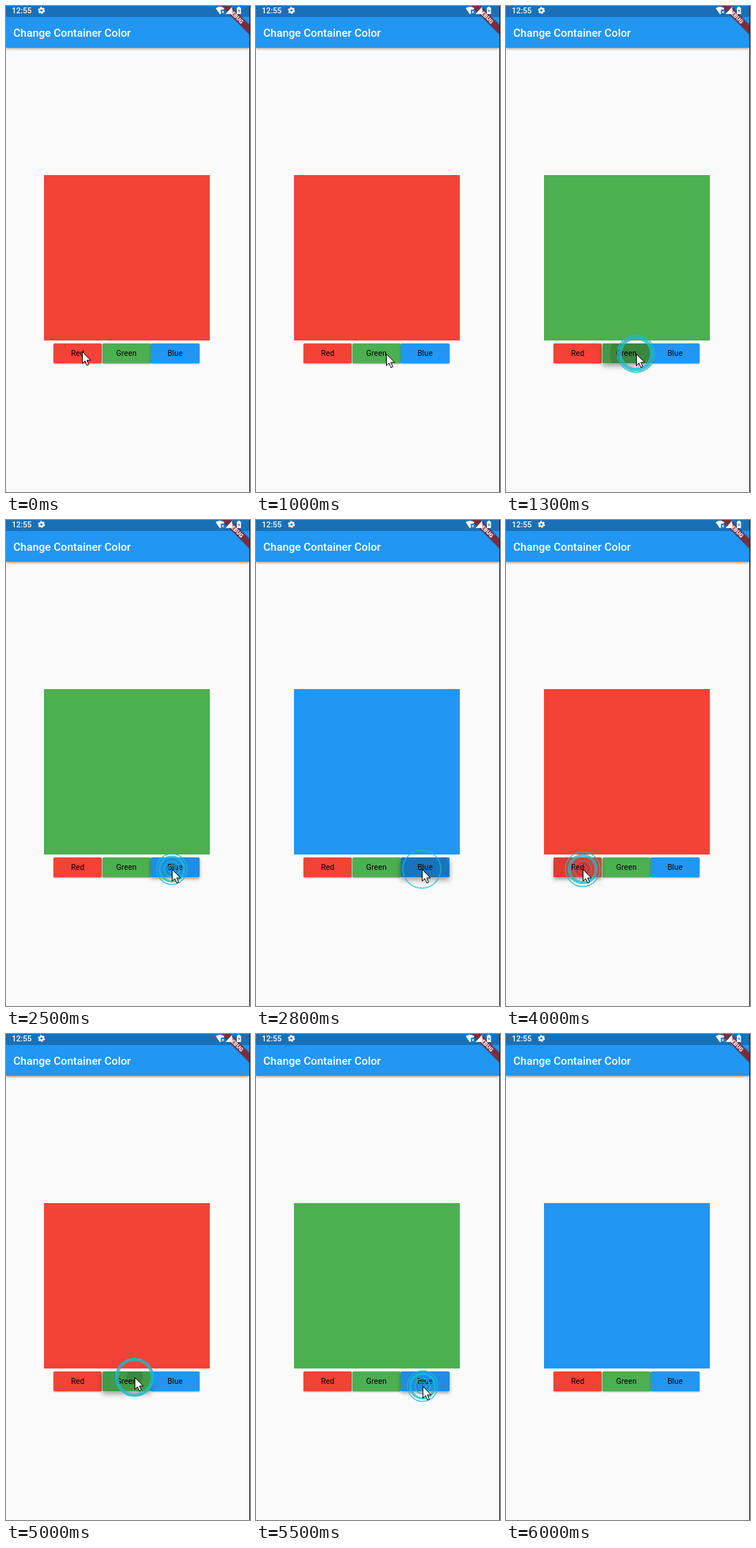
An HTML page for the animation above (6.7 s loop, 334 px wide and 664 px high).

```html
<!DOCTYPE html>
<html lang="en">
<head>
<meta charset="utf-8">
<title>Change Container Color</title>
<style>
html, body { margin: 0; width: 100%; height: 100%; overflow: hidden; }
body { background: #fafafa; font-family: Roboto, sans-serif; font-weight: 500; }
#stage { position: relative; width: 334px; height: 664px; overflow: hidden; }
#stage > * { position: absolute; }
.status { left: 0; top: 0; width: 333px; height: 15px; background: #1a70b6; }
.bar {
  left: 0; top: 15px; width: 333px; height: 42.3px; background: #2196f3;
  box-shadow: 0 1.5px 3px rgba(0,0,0,.38);
}
.bar span {
  position: absolute; left: 10px; top: 1px; line-height: 43px;
  font-size: 15.1px; color: #fff; white-space: nowrap;
}
#box { left: 51.5px; top: 230.5px; width: 227px; height: 226px; }
.btn {
  top: 460.8px; width: 66.4px; height: 27.3px; border-radius: 1.5px;
  font-size: 10.57px; font-weight: 400; letter-spacing: .1px;
  line-height: 27.3px; text-align: center; color: #000;
}
svg { left: 0; top: 0; z-index: 2; }
</style>
</head>
<body>
<div id="stage">
  <div class="status"></div>
  <div class="bar"><span>Change Container Color</span></div>
  <div id="box"></div>
  <div class="btn" style="left:65px">Red</div>
  <div class="btn" style="left:131.6px">Green</div>
  <div class="btn" style="left:198.2px">Blue</div>
  <svg width="334" height="664" viewBox="0 0 334 664">
    <g transform="translate(315 14) rotate(45)">
      <rect x="-30" y="-5.5" width="60" height="11" fill-opacity=".15"/>
      <rect x="-30" y="-4.5" width="60" height="9" fill="#792d3f"/>
      <text y="2.8" text-anchor="middle" font-size="7.7" font-weight="900" fill="#fff">DEBUG</text>
    </g>
    <g fill="#fff">
      <text x="8" y="10.2" font-size="10.7">12:55</text>
      <circle cx="48.5" cy="6" r="2.7" fill="none" stroke="#fff" stroke-width="2.2"/>
      <circle cx="48.5" cy="6" r="4.2" fill="none" stroke="#fff" stroke-width="1.3" stroke-dasharray="2.2 2.2"/>
      <path d="M287 3Q293 -1 299 3L297.5 5H294V10.5L293 11.5Z"/>
      <path d="M295.3 6.5l3 3.5m0-3.5l-3 3.5" stroke="#fff"/>
      <path d="M309.5 1V11H300.5Z"/>
      <path d="M316 2.2h1.5V1h2.6v1.2h1.5V11H316Z"/>
      <path d="M319.3 3.7l-1.7 3.2h1.1v2.7l1.7-3.5h-1.1Z" fill="#1a70b6"/>
    </g>
    <path d="M333.5 0V664" stroke="#222"/>
    <g id="rings" fill="none" stroke="#1cbccb">
      <circle/><circle/><circle/><circle/>
    </g>
    <path id="cursor" d="M.5 .5V16.4L4.1 13L6.8 19L9.3 17.9L6.7 12H11.8Z" fill="#fff" stroke="#000"/>
  </svg>
</div>
<script>
const LOOP = 6700, TICK = 100, HIDE = 6000;
const colors = ['#f34236', '#4caf50', '#2196f3'];

const home = { x: 104, y: 472 };
const moves = [
  { from: 200, to: 800, x: 195, y: 473 },
  { from: 900, to: 1000, x: 178, y: 475 },
  { from: 1300, to: 1600, x: 192, y: 471 },
  { from: 1700, to: 2300, x: 227, y: 477 },
  { from: 3100, to: 3800, x: 105, y: 477 },
  { from: 4200, to: 4500, x: 176, y: 469 },
  { from: 5100, to: 5400, x: 228, y: 481 },
  { from: 5800, to: 6000, x: 230, y: 492 }
];
const clicks = [
  { down: 1050, up: 1200, btn: 1 },
  { down: 2400, up: 2700, btn: 2 },
  { down: 3850, up: 4000, btn: 0 },
  { down: 4680, up: 5100, btn: 1 },
  { down: 5400, up: 5700, btn: 2 }
];

const $ = id => document.getElementById(id);
const box = $('box'), cursor = $('cursor');
const btns = [...document.querySelectorAll('.btn')];
const rings = [...$('rings').children];
const clamp = v => Math.min(1, Math.max(0, v));
const easeOut = u => 1 - (1 - u) ** 3.2;

function cursorAt(t) {
  return moves.reduce((p, m) => {
    const u = easeOut(clamp((t - m.from) / (m.to - m.from)));
    return { x: p.x + (m.x - p.x) * u, y: p.y + (m.y - p.y) * u };
  }, home);
}

function drawButton(el, n, t, click) {
  let press = 0, fill = colors[n];
  if (click && click.btn === n) {
    const age = t - click.down, after = Math.max(0, t - click.up);
    const { x, y } = cursorAt(click.down);
    const r = 7 + age * .012 + after * .25;
    press = clamp(age / 200) * clamp(1 - (after - 100) / 200);
    const ink = `rgba(0,0,0,${.12 * press})`;
    fill = `radial-gradient(circle at ${x - el.offsetLeft}px ${y - el.offsetTop}px, ` +
      `${ink} ${r}px, transparent ${r + 1}px), linear-gradient(${ink}, ${ink}), ${colors[n]}`;
  }
  el.style.background = fill;
  el.style.zIndex = press ? 1 : 0;
  el.style.boxShadow = `0 ${1 + 3 * press}px ${2 + 5 * press}px rgba(0,0,0,.36)`;
}

// a fast thin ring, a slower thick band and two short-lived inner rings
function drawRings(click, t) {
  const age = click ? t - click.down : LOOP;
  const { x, y } = cursorAt(click ? click.down : 0);
  const outer = 26 * (1 - Math.exp(-age / 62));
  const band = Math.min(outer, 13.5 + age * .033);
  const bandWidth = 5 * Math.sin(Math.PI * clamp(age / 460));
  const fade = clamp((480 - age) / 140), inner = clamp((200 - age) / 100);
  const ring = (i, r, width, opacity) => {
    const set = { cx: x, cy: y, r, 'stroke-width': width, 'stroke-opacity': opacity };
    for (const k in set) rings[i].setAttribute(k, set[k]);
  };
  ring(0, outer, 1.3, .9 * fade);
  ring(1, band, bandWidth, .78 * fade);
  ring(2, outer / 2, 1.5, .8 * inner);
  ring(3, outer / 4, 1.5, .7 * inner);
}

function draw(now) {
  const t = Math.floor(now % LOOP / TICK) * TICK;
  const click = clicks.filter(c => c.down <= t).pop();
  const done = clicks.filter(c => c.up <= t).pop();
  box.style.background = colors[done ? done.btn : 0];
  btns.forEach((el, n) => drawButton(el, n, t, click));
  drawRings(click, t);

  const { x, y } = cursorAt(t);
  cursor.setAttribute('transform', `translate(${x} ${y})`);
  cursor.style.display = t < HIDE ? '' : 'none';
}

const start = performance.now();
function tick() {
  draw(performance.now() - start);
  requestAnimationFrame(tick);
}
tick();
</script>
</body>
</html>
```
